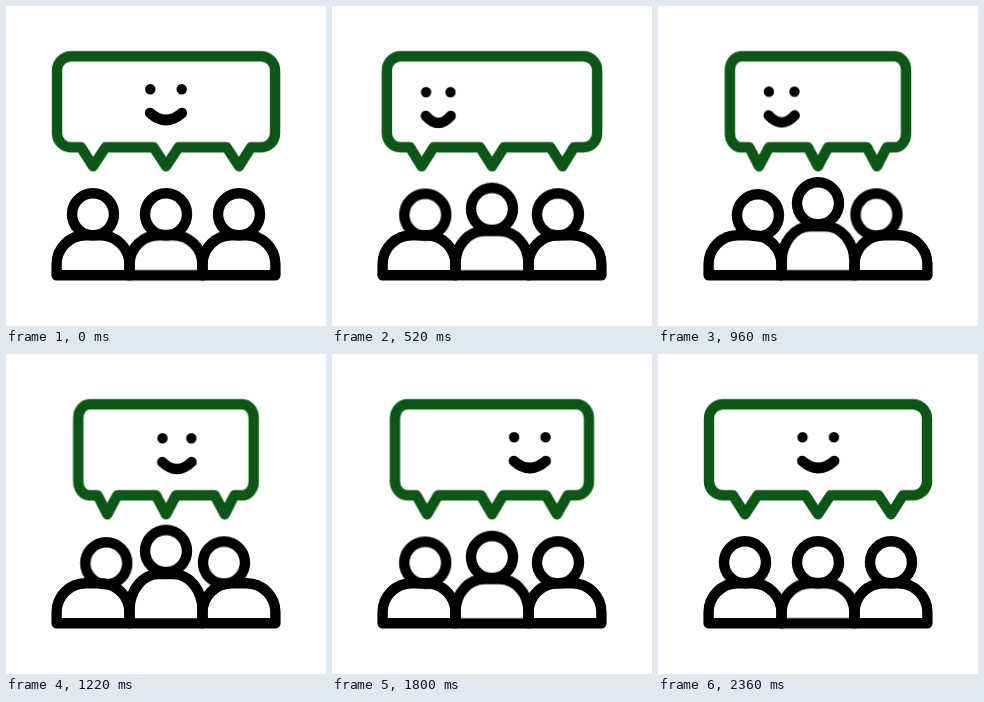
These frames come from a looping animation (320x320 px, 2400 ms). An HTML page:

```html
<!DOCTYPE html>
<html lang="en">
<head>
<meta charset="utf-8">
<title>Happy audience</title>
<style>
  html, body { margin: 0; width: 100%; height: 100%; overflow: hidden; background: #fff; }
  svg { display: block; width: 320px; height: 320px; stroke: #000; }
  path, circle {
    fill: none;
    stroke-width: 10.4px;
    stroke-linecap: round;
    stroke-linejoin: round;
    vector-effect: non-scaling-stroke;
  }
  .bubble { stroke: #0c5715; }

  /* Each keyframe eases like a sine unless it sets its own curve. */
  .bubble, .face, .head, .body { animation: 2400ms cubic-bezier(.37, 0, .63, 1) infinite; }
  .bubble { animation-name: squeeze; }
  .face { animation-name: look; }
  .head { animation-name: lean; }
  .body { animation-name: rise; }

  .left { --x: 13.3px; --y: 1px; }
  .mid { --x: 0px; --y: -11.3px; }
  .right { --x: -15px; --y: .3px; }

  @keyframes squeeze {
    0% { transform: translate(160px, .3px); animation-timing-function: cubic-bezier(.9, 0, .45, 1); }
    45%, 55% { transform: translate(160px, .3px) scaleX(.805); animation-timing-function: cubic-bezier(.7, 0, .3, 1); }
    96.667%, 100% { transform: translate(160px, .3px); }
  }
  @keyframes look {
    0% { transform: translate(160px, 0); animation-timing-function: cubic-bezier(.4, 0, .3, 1); }
    27.083%, 30% { transform: translate(104.5px, 3px) scaleX(.77); }
    65% { transform: translate(206.5px, 0); }
    100% { transform: translate(160px, 0); }
  }
  @keyframes lean {
    0% { transform: translate(0, 0); }
    45%, 53.333% { transform: translate(var(--x), var(--y)); }
    95%, 100% { transform: translate(0, 0); }
  }
  @keyframes rise {
    0% { transform: translate(160px, 269.3px); }
    45%, 53.333% { transform: translate(160px, 269.3px) scaleY(1.23); }
    95%, 100% { transform: translate(160px, 269.3px); }
  }
</style>
</head>
<body>
<svg viewBox="0 0 320 320">
  <defs>
    <path id="torso" d="M-36.4 0V-11A29 29 0 0 1 -7.4 -40H7.4A29 29 0 0 1 36.4 -11V0Z"/>
  </defs>

  <path class="bubble" d="M-95 141H-85L-73 160L-60.5 141H-12.5L0 160L12.5 141H60.5L73 160L85 141H95
    A14 14 0 0 0 109 127V64A14 14 0 0 0 95 50H-95A14 14 0 0 0 -109 64V127A14 14 0 0 0 -95 141Z"/>

  <g class="face">
    <path d="M-15.7 83.3h.01M15.7 83.3h.01"/>
    <path d="M-16 107Q0 121 16 107"/>
  </g>

  <use href="#torso" x="87" y="269.3"/>
  <use href="#torso" class="body"/>
  <use href="#torso" x="233" y="269.3"/>

  <circle class="head left" cx="87" cy="208.3" r="21"/>
  <circle class="head mid" cx="160" cy="208.3" r="21"/>
  <circle class="head right" cx="233" cy="208.3" r="21"/>
</svg>
</body>
</html>
```
